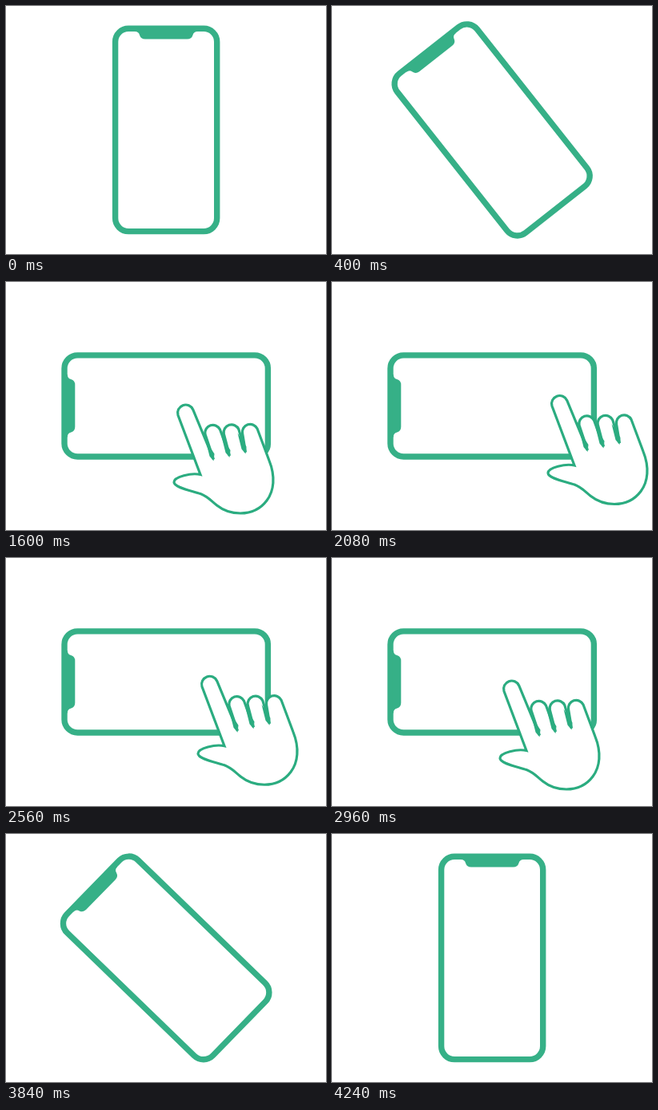
These frames come from a looping animation (400x311 px, 4320 ms). An HTML page:

```html
<!DOCTYPE html>
<html lang="en">
<head>
<meta charset="utf-8">
<title>Rotate and swipe</title>
<style>
  html, body { margin: 0; width: 100%; height: 100%; overflow: hidden; background: #fff; }
  svg { display: block; width: 100vw; height: 100vh; }
</style>
</head>
<body>
<svg viewBox="0 0 400 311">
  <g id="phone">
    <rect x="136.6" y="28.2" width="127.1" height="254.4" rx="16.5" fill="#fff" stroke="#36b087" stroke-width="7.4"/>
    <path fill="#36b087" d="M161 31 v1 q5 0 6 4.500 q1.500 5 7 5 h52.500 q5.500 0 7 -5 q1 -4.500 6 -4.500 v-1 z"/>
  </g>
  <g id="hand">
    <path id="outline" fill="#fff" stroke="#2bac80" stroke-width="3.2"/>
    <path id="gaps" fill="#2bac80"/>
  </g>
</svg>
<script>
const LOOP = 4320, STEP = 80;
const [phone, hand, outline, gaps] =
  ['phone', 'hand', 'outline', 'gaps'].map(id => document.getElementById(id));

// Index finger, three equal fingers with gaps between, then palm and thumb
let shape = 'M243 241.5 L215 167 A10 10 0 0 1 233.7 160';
let wedges = '';
for (let i = 0; i < 3; i++) {
  const x = 249 + 23.3 * i, y = 191 - 0.5 * i;
  const tipX = 259.5 + 20 * i, tipY = 222.5 - 4.5 * i;
  shape += `L${tipX} ${tipY} L${x} ${y} a9.8 9.8 0 0 1 18.5 -6`;
  wedges += `M${tipX} ${tipY + 2} l-5 -6 l-5 -20 l11 17 z`;
}
shape += `L329 224 C337 244 335 262 326 274 S305 290 293 290
  S271 286 263.500 280 S252 269 243 265.600 S210 258 210 251
  S232 239 243 241.500 Z`;
outline.setAttribute('d', shape);
gaps.setAttribute('d', wedges);

// Eased progress from 0 to 1 between two times
function ramp(t, from, to) {
  const p = Math.min(1, Math.max(0, (t - from) / (to - from)));
  return p * p * (3 - 2 * p);
}

const start = performance.now();
function draw() {
  const elapsed = (performance.now() - start) % LOOP;
  const t = Math.floor(elapsed / STEP) * STEP;

  const turn = ramp(t, 40, 840) - ramp(t, 3450, 4240);
  const visible = ramp(t, 700, 840) - ramp(t, 3360, 3500);
  const enter = 1 - ramp(t, 880, 1220);
  const swipe = enter + ramp(t, 1680, 2080) - ramp(t, 2160, 2960);
  const leave = ramp(t, 2960, 3360);
  const x = 60 * swipe + 51 * leave, y = -11.5 * swipe - 6 * leave;

  phone.setAttribute('transform', `rotate(${-90 * turn} 200.2 155.4)`);
  hand.setAttribute('transform', `translate(${x} ${y}) rotate(${5.5 * enter} 245 214)`);
  hand.setAttribute('opacity', visible);
  requestAnimationFrame(draw);
}
draw();
</script>
</body>
</html>
```
